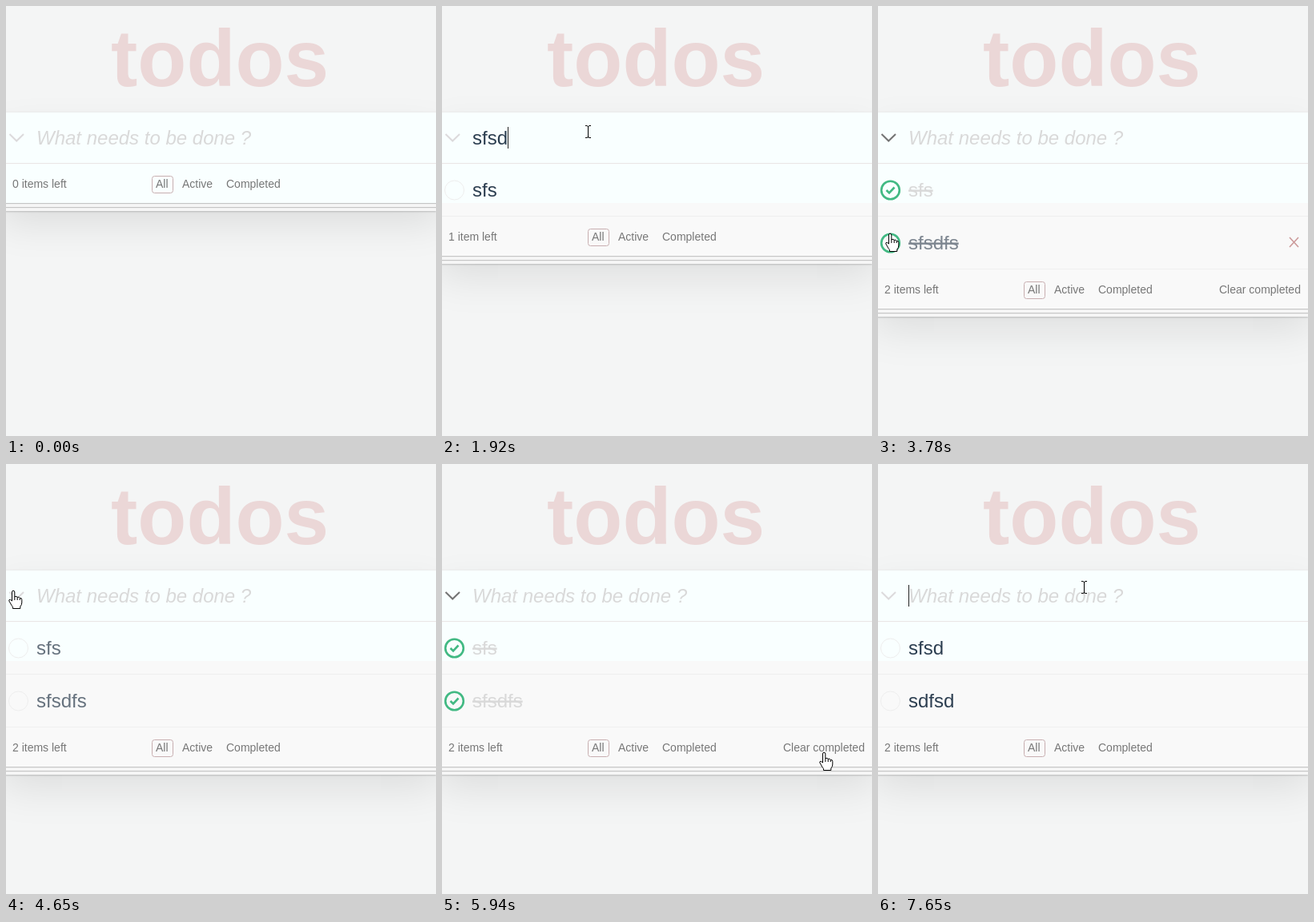
Recreate the animation shown at these times as an HTML page. Size 537x537 px, loop 8000 ms.

```html
<!DOCTYPE html>
<html lang="en">
<head>
<meta charset="utf-8">
<title>Todo list</title>
<style>
html, body { margin: 0; width: 100%; height: 100%; overflow: hidden; background: #f4f5f5; }
#stage { position: relative; width: 537px; height: 537px; overflow: hidden; }
#panel {
  position: absolute; left: -7px; top: 133px; width: 550px;
  background: linear-gradient(#f9ffff 113px, #f9f9f9 113px);
  box-shadow: 0 1px 1px rgba(0,0,0,.2), 0 8px 0 -3px #f6f6f6, 0 9px 1px -3px rgba(0,0,0,.2),
    0 16px 0 -6px #f6f6f6, 0 17px 2px -6px rgba(0,0,0,.2),
    0 2px 4px rgba(0,0,0,.2), 0 25px 50px rgba(0,0,0,.1);
}
svg { position: absolute; left: 0; top: 0; font: 24px "Liberation Sans", Arial, sans-serif; fill: #2c3e50; }
path, circle, rect { fill: none; }
text { white-space: pre; }
.title { font-size: 100px; font-weight: bold; fill: #ebd7d7; }
.hint { font-style: italic; fill: #d9d9d9; }
.rule { stroke: #efefef; }
.cross { stroke: #cc9a9a; stroke-width: 1.6; }
.tick { stroke: #42b983; stroke-width: 2.6; }
#footer { font-size: 14px; fill: #777; }
#cursor path { stroke: #000; }
#cursor .solid { fill: #fff; }
</style>
</head>
<body>
<div id="stage">
  <div id="panel"></div>
  <svg width="537" height="537">
    <text class="title" x="131" y="100">todos</text>
    <path stroke="#e9e5e5" d="M0 196.5H537"/>
    <path id="chevron" stroke-width="2" d="M4.5 160L13.2 168.5 22 160"/>
    <text id="hint" class="hint" x="38" y="173">What needs to be done ?</text>
    <text id="input" x="38" y="173"></text>
    <path id="caret" stroke="#222" d="M0 151V178"/>
    <g id="rows"></g>
    <g id="footer">
      <text id="count" x="8" y="227"></text>
      <rect x="182.5" y="212.5" width="26" height="21" rx="3" stroke="#c8aeb0"/>
      <text x="187" y="227">All</text>
      <text x="220" y="227">Active</text>
      <text x="275" y="227">Completed</text>
      <text id="clear" x="426" y="227">Clear completed</text>
    </g>
    <g id="cursor">
      <path id="beam" d="M-3 -7.5H-1L.5 -6.5 2 -7.5H4M.5 -7V7.5M-3 7.5H-1L.5 6.5 2 7.5H4"/>
      <path id="arrow" class="solid" d="M.5 .5V16.5L4 13 6.5 18.5 8.7 17.5 6.3 12H11.5Z"/>
      <g id="hand">
        <path class="solid" d="M-1.5 12V1Q-1.5-.8 0-.8 1.8-.8 1.8 1V6.6Q4.4 5.8 5.2 7.3 7.5 6.6 8.3 8.4 10.8 8 10.8 10.5V14Q10.8 17 8.8 19V21.5H-.5V19.5Q-2 18-4 14-6 11.5-5 10.6-3.5 9.5-1.5 12Z"/>
        <path d="M1.8 6.5V11M5.2 7.3V11M8.3 8.4V11"/>
      </g>
    </g>
  </svg>
</div>
<script>
const LOOP = 8000, STEP = 30, FADE = 450, ROW = 66;
const INK = [44, 62, 80], PALE = [217, 217, 217];
const $ = id => document.getElementById(id);

const type = (word, times) => times.map((t, i) => [t, s => { s.input = word.slice(0, i + 1); }]);
const enter = t => [t, s => { s.items.push({ text: s.input, done: false, at: -FADE }); s.input = ""; }];
const mark = (t, done, ...ids) => [t, s => {
  s.caret = false;
  ids.forEach(i => Object.assign(s.items[i], { done, at: t }));
}];
const caret = (t, on) => [t, s => { s.caret = on; }];

const events = [
  caret(750, true),
  ...type("sfs", [990, 1140, 1260]), enter(1470),
  ...type("sfsdfs", [1620, 1710, 1800, 1860, 1950, 2100]), enter(2280),
  caret(2760, false),
  mark(3090, true, 0),
  mark(3570, true, 1),
  mark(4350, false, 0, 1),
  mark(4980, true, 0, 1),
  [6120, s => { s.items = []; }],
  caret(6480, true),
  ...type("sfsd", [6660, 6750, 6840, 6930]), enter(7050),
  ...type("sdfsd", [7170, 7230, 7290, 7350, 7440]), enter(7650)
];

// time, x, y of the pointer's hot spot
const track = [
  [90, 446, 59], [720, 182, 157], [2760, 182, 157], [3060, 15, 231], [3300, 15, 231],
  [3540, 15, 296], [3690, 15, 296], [4200, 9, 159], [5370, 9, 159],
  [5910, 477, 361], [6120, 477, 361], [6480, 257, 154], [LOOP, 257, 154]
];

function pointAt(t) {
  const i = Math.max(1, track.findIndex(k => k[0] > t));
  const [t0, x0, y0] = track[i - 1], [t1, x1, y1] = track[i];
  const u = Math.max(0, (t - t0) / (t1 - t0)), e = u * u * (3 - 2 * u);
  return [Math.round(x0 + (x1 - x0) * e), Math.round(y0 + (y1 - y0) * e)];
}

function stateAt(t) {
  const s = { input: "", caret: false, items: [] };
  events.forEach(([at, change]) => { if (at <= t) change(s); });
  return s;
}

function rowMarkup(item, i, t, hovered) {
  const u = Math.min(1, (t - item.at) / FADE), k = item.done ? u : 1 - u;
  const color = INK.map((c, n) => Math.round(c + (PALE[n] - c) * k));
  const ring = item.done
    ? `<circle class="tick" cx="15.5" cy="230" r="11.3"/><path class="tick" d="M10.5 230L14 233.5 20.5 226.5"/>`
    : `<circle cx="15.5" cy="230" r="12" stroke="#eee"/>`;
  return `<g transform="translate(0 ${i * ROW})">${ring}
    <text x="38" y="238" style="fill:rgb(${color})"
      ${item.done ? 'text-decoration="line-through"' : ""}>${item.text}</text>
    <path class="rule" d="M0 262.5H537"/>
    ${hovered ? '<path class="cross" d="M514 223L525 235M525 223L514 235"/>' : ""}</g>`;
}

const show = (id, on) => { $(id).style.display = on ? "" : "none"; };

function drawCursor(t, x, y, s) {
  const inInput = y >= 133 && y < 196;
  const overRow = y >= 197 && y < 197 + ROW * s.items.length;
  const overClear = x > 425 && x < 529 && Math.abs(y - 222 - ROW * s.items.length) < 13;
  const hand = (x < 30 && (inInput || overRow)) || (overClear && s.items.some(i => i.done));
  show("cursor", t >= 90);
  show("hand", hand);
  show("beam", inInput && !hand);
  show("arrow", !inInput && !hand);
  $("cursor").setAttribute("transform", `translate(${x} ${y})`);
}

function draw(time) {
  const t = Math.floor(time / STEP) * STEP;
  const s = stateAt(t), n = s.items.length, [x, y] = pointAt(t);
  const hover = Math.floor((y - 197) / ROW);

  $("panel").style.height = 113 + ROW * n + "px";
  $("footer").setAttribute("transform", `translate(0 ${ROW * n})`);
  $("count").textContent = `${n} ${n === 1 ? "item" : "items"} left`;
  show("clear", s.items.some(i => i.done));
  $("chevron").setAttribute("stroke", n && s.items.every(i => i.done) ? "#737373" : "#dcdadc");

  $("input").textContent = s.input;
  show("hint", !s.input);
  show("caret", s.caret);
  const end = s.input ? $("input").getComputedTextLength() : 0;
  $("caret").setAttribute("transform", `translate(${Math.round(38 + end) + .5} 0)`);

  $("rows").innerHTML = s.items.map((item, i) => rowMarkup(item, i, t, i === hover)).join("");
  drawCursor(t, x, y, s);
}

const start = performance.now();
function tick() {
  draw((performance.now() - start) % LOOP);
  requestAnimationFrame(tick);
}
tick();
</script>
</body>
</html>
```
